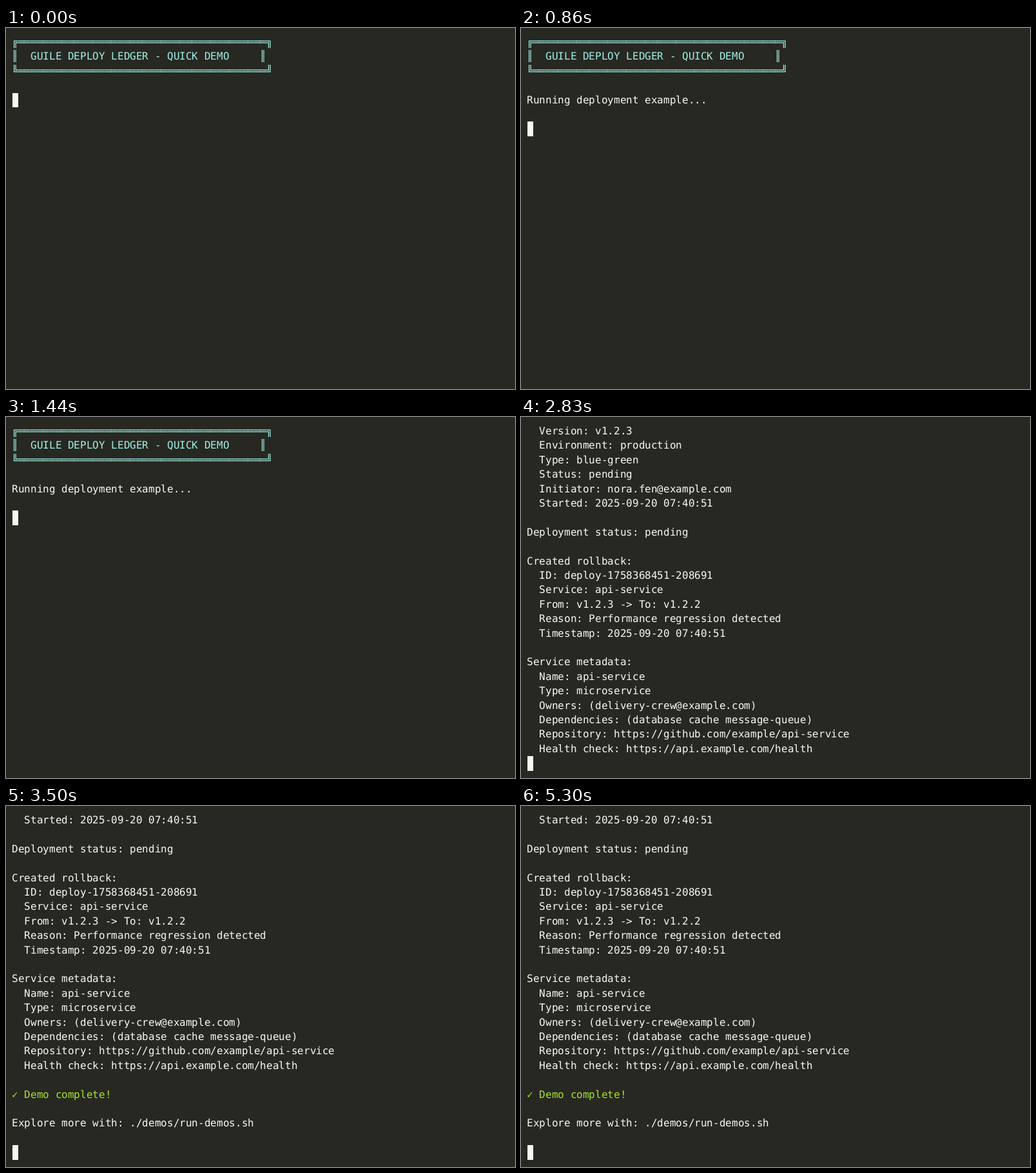
An HTML page for the animation above (6.5 s loop, 790 by 560 pixels).

```html
<!DOCTYPE html>
<html lang="en">
<head>
<meta charset="utf-8">
<title>Terminal demo</title>
<style>
  html, body { margin: 0; width: 100%; height: 100%; overflow: hidden; background: #272822; }
  svg { display: block; }
  text {
    font: 16px "DejaVu Sans Mono", monospace;
    font-variant-ligatures: none;
    text-rendering: geometricPrecision;
    white-space: pre;
    fill: #f8f8f2;
  }
  .cyan { fill: #a1efe4; }
  .green { fill: #a6e22e; }
  #cursor { fill: #f8f8f2; shape-rendering: crispEdges; }
</style>
</head>
<body>
<svg id="screen" width="790" height="560" viewBox="0 0 790 560">
  <rect id="cursor"/>
</svg>
<script>
const LOOP = 6500;
const FONT = 16;
const COL = FONT * 1233 / 2048;
const ROW = FONT * 1.4;
const bar = "═".repeat(40);

const lines = [
  `╔${bar}╗`,
  "║  GUILE DEPLOY LEDGER - QUICK DEMO     ║",
  `╚${bar}╝`,
  "",
  "Running deployment example...",
  "",
  "  Version: v1.2.3",
  "  Environment: production",
  "  Type: blue-green",
  "  Status: pending",
  "  Initiator: nora.fen@example.com",
  "  Started: 2025-09-20 07:40:51",
  "",
  "Deployment status: pending",
  "",
  "Created rollback:",
  "  ID: deploy-1758368451-208691",
  "  Service: api-service",
  "  From: v1.2.3 -> To: v1.2.2",
  "  Reason: Performance regression detected",
  "  Timestamp: 2025-09-20 07:40:51",
  "",
  "Service metadata:",
  "  Name: api-service",
  "  Type: microservice",
  "  Owners: (delivery-crew@example.com)",
  "  Dependencies: (database cache message-queue)",
  "  Repository: https://github.com/example/api-service",
  "  Health check: https://api.example.com/health",
  "",
  "✓ Demo complete!",
  "",
  "Explore more with: ./demos/run-demos.sh",
  ""
];

// Visible slice of the log; the cursor sits on the row after it.
const steps = [
  { at: 0, first: 0, end: 4 },
  { at: 860, first: 0, end: 6 },
  { at: 1820, first: 6, end: 29 },
  { at: 3500, first: 11, end: 34 }
];

const screen = document.getElementById("screen");
const cursor = document.getElementById("cursor");
const rowTop = row => 11 + Math.round(row * ROW);

function setAttrs(el, attrs) {
  for (const [name, value] of Object.entries(attrs)) el.setAttribute(name, value);
}

function colorOf(line) {
  if (/^[╔║╚]/.test(line)) return "cyan";
  return line.startsWith("✓") ? "green" : "";
}

// Each glyph is snapped to a whole pixel column.
const texts = lines.map(line => {
  const el = document.createElementNS("http://www.w3.org/2000/svg", "text");
  const xs = [...line].map((_, col) => Math.floor((col + 1) * COL));
  setAttrs(el, { x: xs.join(" "), class: colorOf(line) });
  el.textContent = line;
  screen.append(el);
  return el;
});

function show({ first, end }) {
  texts.forEach((el, i) => {
    const visible = i >= first && i < end;
    el.style.display = visible ? "" : "none";
    if (visible) el.setAttribute("y", rowTop(i - first) + FONT);
  });
  const row = end - first;
  const top = rowTop(row);
  setAttrs(cursor, { x: 10, y: top, width: 9, height: rowTop(row + 1) - top });
}

let current;
const start = performance.now();

function tick() {
  const time = (performance.now() - start) % LOOP;
  const step = steps.findLast(s => s.at <= time);
  if (step !== current) show(current = step);
  requestAnimationFrame(tick);
}
tick();
</script>
</body>
</html>
```
